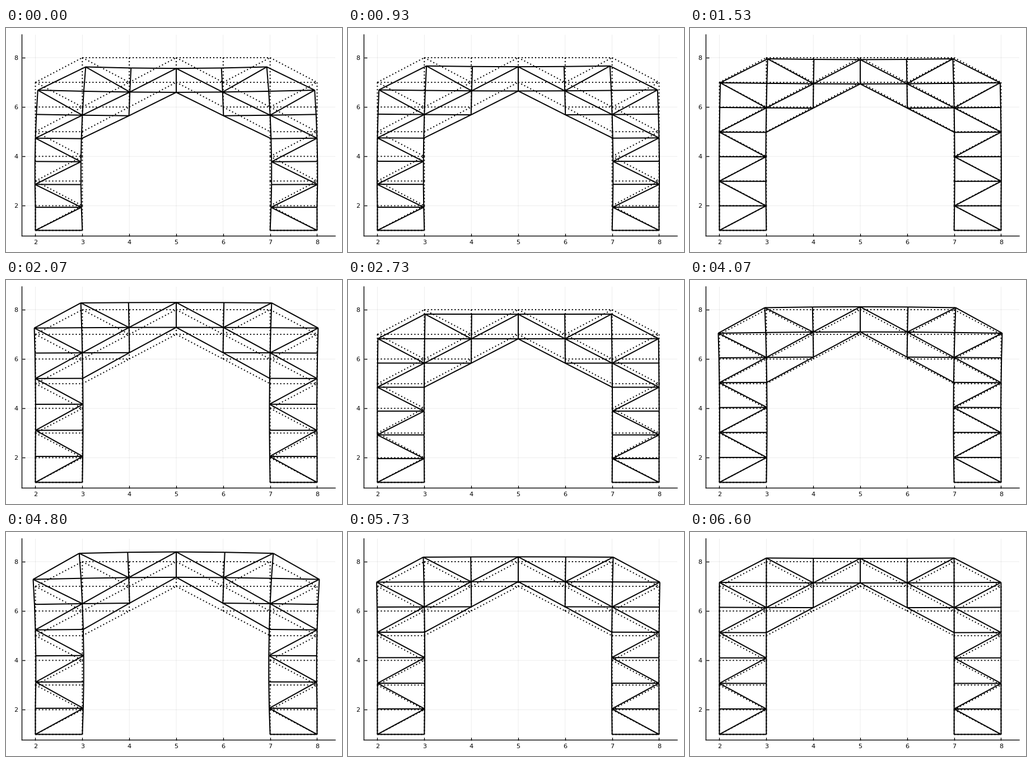
Write a matplotlib script that moves like this. It is 600 by 400 pixels and loops after 6670 ms.

```python
import numpy as np
import matplotlib.pyplot as plt
from matplotlib.animation import FuncAnimation
from matplotlib.collections import LineCollection

W, H, DPI = 600, 400, 100
TICK_MS, TICKS = 23, 290
FPS, STEPS = 15, 100            # the truss itself moves in 15 steps a second
FREQ = np.array([0.0778, 0.0906])   # cycles per step of the two modes
LAG = 0.32                      # steps
LEFT, BOTTOM, RIGHT, TOP = 28.5, 371.5, 588, 12   # axes box in pixels


def build_nodes():
    """Two legs, a stepped roof and its ridge on the unit lattice."""
    lowest = {3: 1, 2: 1, 1: 6, 0: 7}
    highest = {3: 7, 2: 8, 1: 8, 0: 8}
    return [(x, y) for x in range(2, 9)
            for y in range(lowest[abs(5 - x)], highest[abs(5 - x)] + 1)]


def build_bars(nodes):
    """Lattice bars, diagonals between odd nodes, and the lower chord."""
    index = {n: i for i, n in enumerate(nodes)}
    pairs = []
    for x, y in nodes:
        steps = [(1, 0), (0, 1)]
        if (x + y) % 2:
            steps += [(1, 1), (1, -1)]
        pairs += [((x, y), (x + dx, y + dy)) for dx, dy in steps]
    chord = [(x, 7 - abs(x - 5)) for x in range(3, 8)]
    pairs += zip(chord, chord[1:])
    return np.array([(index[a], index[b]) for a, b in pairs
                     if a in index and b in index])


def build_modes(rest):
    """Mode 1: legs shorten and the roof sags; mode 2: mostly bending."""
    r, s = 5 - rest[:, 0], rest[:, 1] - 1
    sag = np.cos(np.pi * r / 6) * (s / 7) ** 2
    shorten = 0.335 * np.sin(0.25 * np.minimum(s, 6)) ** 1.15
    lean = 0.0036 * s * (s - 5) * np.sin(np.pi * r / 5)
    squeeze = 0.0047 * r * (abs(r) - 2) * (s > 0)
    dx = lean + squeeze
    return (np.column_stack([dx, -shorten - 0.062 * sag]),
            np.column_stack([dx / 2, 0.0022 * s - 0.06 * sag]))


nodes = build_nodes()
bars = build_bars(nodes)
rest = np.array(nodes, float)
mode1, mode2 = build_modes(rest)


def segments(step):
    c1, c2 = np.cos(2 * np.pi * FREQ * (step - LAG))
    return (rest + c1 * mode1 + c2 * mode2)[bars]


def pt(pixels):
    return pixels * 72 / DPI


def data_x(pixel):
    return 2 + (pixel - 52.5) / 83.83


def data_y(pixel):
    return 1 + (361.4 - pixel) / 44.06


fig = plt.figure(figsize=(W / DPI, H / DPI), dpi=DPI, facecolor="white")
ax = fig.add_axes([LEFT / W, 1 - BOTTOM / H,
                   (RIGHT - LEFT) / W, (BOTTOM - TOP) / H])
ax.set_xlim(data_x(LEFT), data_x(RIGHT))
ax.set_ylim(data_y(BOTTOM), data_y(TOP))
ax.set_xticks(range(2, 9))
ax.set_yticks(range(2, 9, 2))
ax.set_axisbelow(True)
ax.grid(color="black", alpha=0.1, linewidth=0.5, snap=False)
ax.spines[["top", "right"]].set_visible(False)
for side in ("left", "bottom"):
    ax.spines[side].set(linewidth=1, snap=False)
ax.tick_params(direction="in", length=pt(5), width=1, pad=pt(7),
               labelsize=8, labelfontfamily="DejaVu Sans")

style = dict(colors="black", linewidths=pt(2), capstyle="butt", snap=False)
ax.add_collection(LineCollection(rest[bars], linestyles=[(0, (1, 2))],
                                 zorder=3, **style), autolim=False)
truss = LineCollection(segments(0), zorder=4, **style)
ax.add_collection(truss, autolim=False)


def update(tick):
    step = int((tick + 1) * TICK_MS * FPS / 1000 + 0.05)
    truss.set_segments(segments(min(step, STEPS - 1)))
    return (truss,)


anim = FuncAnimation(fig, update, frames=TICKS, interval=TICK_MS,
                     repeat=True, repeat_delay=0)
plt.show()
```
